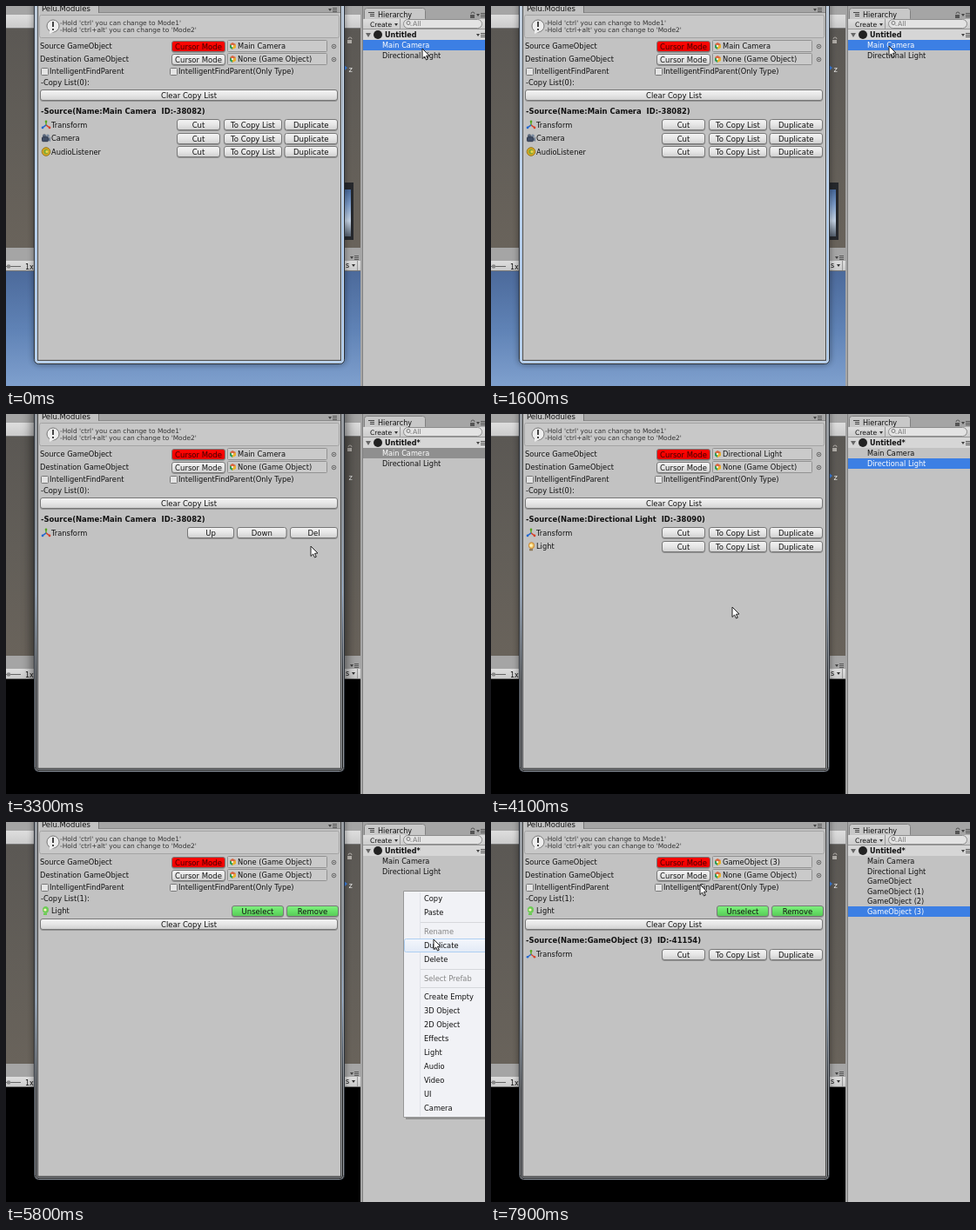
Recreate the animation shown at these times as an HTML page with a canvas. Size 550 px wide and 437 px high, loop 8 s.

```html
<!DOCTYPE html>
<html lang="en">
<head>
<meta charset="utf-8">
<style>
  html, body { margin: 0; width: 550px; height: 437px; overflow: hidden; background: #c2c2c2; }
  canvas { display: block; }
</style>
</head>
<body>
<canvas id="stage" width="550" height="437"></canvas>
<script>
const c = document.getElementById('stage').getContext('2d');
const LOOP = 8000, STEP = 100;

// Pointer tip: time, x, y
const PATH = [
  [0, 478, 49], [100, 478, 57], [900, 478, 57], [1200, 459, 48], [1600, 457, 46], [1700, 457, 46],
  [2100, 335, 185], [2400, 329, 194], [2600, 329, 194], [2800, 350, 152], [3500, 350, 152],
  [3800, 462, 56], [3900, 440, 80], [4100, 277, 222], [4400, 277, 222], [4600, 285, 151],
  [4800, 285, 151], [5100, 453, 113], [5300, 456, 90], [5500, 455, 79], [5600, 458, 84],
  [5800, 491, 135], [6000, 496, 212], [6200, 497, 203], [6400, 497, 203], [6800, 480, 122],
  [7500, 480, 122], [7900, 240, 72]
];
const MENU = [
  ['Copy', 88], ['Paste', 104], ['Rename', 126, 1], ['Duplicate', 142], ['Delete', 158],
  ['Select Prefab', 180, 1], ['Create Empty', 201], ['3D Object', 217], ['2D Object', 233],
  ['Effects', 249], ['Light', 265], ['Audio', 281], ['Video', 297], ['UI', 313], ['Camera', 329]
];
const MODES = [
  [['Cut', 196, 50], ['To Copy List', 250, 67], ['Duplicate', 319.5, 61.5]],
  [['Up', 208, 54], ['Down', 265, 57.5], ['Del', 326, 55]]
];

function rect(x, y, w, h, color) {
  c.fillStyle = color;
  c.fillRect(x, y, w, h);
}
function shade(y, h, ...colors) {
  const g = c.createLinearGradient(0, y, 0, y + h);
  colors.forEach((k, i) => g.addColorStop(i / (colors.length - 1), k));
  return g;
}
function box(x, y, w, h, r, fill, line) {
  c.beginPath();
  c.roundRect(x + .5, y + .5, w - 1, h - 1, r);
  if (fill) { c.fillStyle = fill; c.fill(); }
  if (line) { c.strokeStyle = line; c.lineWidth = 1; c.stroke(); }
}
function poly(points, fill, line) {
  c.beginPath();
  points.forEach(([x, y]) => c.lineTo(x, y));
  c.closePath();
  c.fillStyle = fill;
  c.fill();
  if (line) { c.strokeStyle = line; c.lineWidth = 1; c.stroke(); }
}
function disc(x, y, r, fill, line) {
  c.beginPath();
  c.arc(x, y, r, 0, 7);
  if (fill) { c.fillStyle = fill; c.fill(); }
  if (line) { c.strokeStyle = line; c.lineWidth = 1; c.stroke(); }
}
function text(s, x, y, size = 8.3, color = '#111', weight = '', align = 'left') {
  c.font = `${weight} ${size}px "DejaVu Sans", Verdana, sans-serif`;
  c.textAlign = align;
  c.fillStyle = color;
  c.fillText(s, x, y + 3);
}
function button(s, x, y, w, tones = ['#f5f5f5', '#e6e6e6', '#cecece'], ink = '#111') {
  box(x, y + 1, w, 13, 2.5, null, 'rgba(60,60,60,.35)');
  box(x, y, w, 13, 2.5, shade(y, 13, ...tones), '#777');
  text(s, x + w / 2, y + 6.7, 8.5, ink, '', 'center');
}
const GREEN = ['#83f283', '#68e068', '#55c955'];
const PINK = ['#f8b9b6', '#f1a6a3', '#d98f8c'];
const RED = ['#ff0a05', '#f80000', '#e60000'];

function menuMark(x, y) {
  poly([[x - 5, y - 1], [x - 1, y - 1], [x - 3, y + 2]], '#444');
  for (let i = -2; i < 3; i += 2) rect(x, y + i, 5, 1, '#555');
}
function lock(x, y, color) {
  rect(x - 2, y, 5, 4, color);
  c.strokeStyle = color;
  c.lineWidth = 1;
  c.beginPath();
  c.arc(x + 1, y - 1, 2, Math.PI, 0);
  c.stroke();
}
function cube(x, y) {
  poly([[x - 3, y - 2], [x, y], [x, y + 4], [x - 3, y + 2]], '#2c9b57');
  poly([[x, y], [x + 4, y - 2], [x + 4, y + 2], [x, y + 4]], '#e8b02c');
  poly([[x - 3, y - 2], [x, y - 4], [x + 4, y - 2], [x, y]], '#d9623b');
  disc(x, y, 1.2, '#f4eedb');
}
function icon(kind, x, y, tint) {
  if (kind === 'Transform') {
    c.lineWidth = 1.4;
    [[0, -4, '#55a51c'], [4, 3, '#d5432b'], [-4, 3, '#2468cf']].forEach(([dx, dy, k]) => {
      c.strokeStyle = k;
      c.beginPath();
      c.moveTo(x, y);
      c.lineTo(x + dx, y + dy);
      c.stroke();
      disc(x + dx, y + dy, 1.3, k);
    });
  } else if (kind === 'Camera') {
    disc(x - 2, y - 3, 2, '#586579');
    disc(x + 2, y - 3, 1.8, '#78889d');
    box(x - 5, y - 2, 8, 6, 1, '#414e66', '#303a4d');
    poly([[x + 3, y], [x + 5, y - 2], [x + 5, y + 4], [x + 3, y + 2]], '#6c7c93');
  } else if (kind === 'AudioListener') {
    disc(x, y, 4.8, '#e5a51f', '#8d7a22');
    disc(x, y, 3, '#86aa35');
    disc(x + 1, y, 1.5, '#f2d64a');
  } else {
    box(x - 3, y - 5, 7, 8, 3, tint || '#f3c767', tint || '#c58334');
    disc(x, y - 1, 1.6, '#fff3bd');
    rect(x - 2, y + 3, 4, 2, tint || '#8a7654');
  }
}

function pointer(t) {
  const i = PATH.findIndex(k => k[0] > t);
  if (i < 0) return PATH.at(-1).slice(1);
  const [t0, x0, y0] = PATH[i - 1], [t1, x1, y1] = PATH[i];
  const p = (t - t0) / (t1 - t0);
  return [x0 + (x1 - x0) * p, y0 + (y1 - y0) * p];
}

function stateAt(t) {
  const clones = t < 6700 ? 0 : t < 7300 ? 1 : t < 7500 ? 2 : t < 7700 ? 3 : 4;
  const objects = ['Main Camera', 'Directional Light'];
  for (let i = 0; i < clones; i++) objects.push('GameObject' + (i ? ` (${i})` : ''));
  const light = t >= 500 && t < 1300 || t >= 3800;
  const sel = clones ? clones + 1 : t >= 5300 ? -1 : light ? 1 : 0;
  const parts = sel > 1 ? ['Transform'] : sel === 1 ? ['Transform', 'Light']
    : ['Transform', 'Camera', 'AudioListener'].filter(p =>
      !(p === 'Camera' && t >= 2900) && !(p === 'AudioListener' && t >= 3300));
  return {
    objects, sel, parts,
    id: sel > 1 ? -41142 - 4 * (sel - 2) : sel === 1 ? -38090 : -38082,
    mode: t >= 2200 && t < 3600 ? 1 : 0,
    focus: t >= 2100 && t < 3800 || t >= 4700 && t < 5300,
    copied: t >= 4700,
    dark: t >= 2900,
    menu: t >= 5600 && t < 6500
  };
}

function backdrop(s) {
  rect(0, 0, 410, 437, '#a5a5a5');
  rect(0, 10, 407, 16, shade(10, 16, '#dedede', '#cacaca'));
  rect(0, 25, 407, 1, '#777');
  rect(0, 26, 407, 252, shade(26, 252, '#5b5854', '#625e58', '#69635b'));
  lock(394, 39, '#b0aca7');
  if (!s.focus) poly([[387, 67], [392, 71], [387, 76]], '#3d83e8');
  text('z', 393.5, 73, 8.3, '#eee');
  if (s.sel === 0 && !s.dark) {
    rect(380, 203, 19, 66, '#26282c');
    rect(380, 211, 16, 54, shade(211, 54, '#47699c', '#7f9fcc', '#c6d4e6', '#55606e'));
  }
  menuMark(400, 289);
  rect(0, 293, 407, 12, shade(293, 12, '#dedede', '#cacaca'));
  rect(0, 304, 407, 1, '#777');
  rect(0, 299, 17, 1, '#666');
  disc(3, 299.5, 2.3, '#888');
  text('1x', 22, 300, 8);
  text('s', 390, 298, 8);
  poly([[397, 297], [401, 297], [399, 300]], '#333');
  rect(403, 293, 1, 11, '#999');
  rect(0, 305, 407, 132, s.dark ? '#000' : shade(305, 132, '#4c6a9b', '#5f82b5', '#7fa0ce'));
  rect(407, 0, 3, 437, '#a5a5a5');
  rect(409, 0, 1, 437, '#828282');
}

function frame(s) {
  const glass = s.dark ? ['#a3a8ae', '#8e959c', '#8fa9c8', '#111', '#111']
    : ['#b4bec9', '#96a1ae', '#a9c9ee', '#8fb5e4', '#9fc2ea'];
  c.save();
  c.shadowColor = s.focus ? 'rgba(0,0,0,.7)' : 'rgba(0,0,0,.4)';
  c.shadowBlur = s.focus ? 14 : 7;
  box(32, -10, 357, 422, 5, shade(0, 411, ...glass), '#2a3038');
  c.restore();
  const edge = s.dark ? '#9a9ea3' : '#d3e3f5';
  box(33, -10, 355, 421, 4, null, edge);
  box(35, -10, 351, 419, 1, null, edge);
  rect(36, 0, 349, 408, '#444');
  rect(37, 0, 347, 407, '#c2c2c2');
}

function sourceField(label, y, value, active) {
  text(label, 39, y);
  button('Cursor Mode', 190, Math.round(y - 5.6), 62, active ? RED : undefined, active ? '#400' : '#111');
  box(254, y - 7, 115, 14, 1, '#cacaca', '#929292');
  cube(260, y);
  text(value, 266, y);
  disc(376.5, y + .5, 2.3, null, '#666');
  disc(376.5, y + .5, .8, '#444');
}
function check(label, x) {
  box(x, 71, 9, 9, 1, '#e4e4e4', '#777');
  text(label, x + 10, 75);
}

function panel(s) {
  const name = s.objects[s.sel];
  rect(107, 0, 277, 7, '#a5a5a5');
  rect(107, 7, 277, 1, '#898989');
  rect(106, 0, 1, 8, '#777');
  text('Pelu.Modules', 41, 2.5, 8.5);
  menuMark(375, 4);

  box(38, 10, 345, 27, 2, '#c8c8c8', '#a4a4a4');
  disc(54, 23, 7, '#eee', '#777');
  poly([[50, 28], [56, 29], [50, 32]], '#eee');
  rect(53, 18, 2, 6, '#444');
  rect(53, 26, 2, 2, '#444');
  text("-Hold 'ctrl' you can change to Mode1'", 62, 19, 7.45, '#333');
  text("-Hold 'ctrl+alt' you can change to 'Mode2'", 62, 27, 7.45, '#333');

  sourceField('Source GameObject', 46, name || 'None (Game Object)', true);
  sourceField('Destination GameObject', 61, 'None (Game Object)');
  check('IntelligentFindParent', 40);
  check('IntelligentFindParent(Only Type)', 188);
  text(`-Copy List(${+s.copied}):`, 40, 88);
  const shift = s.copied ? 15.3 : 0;
  if (s.copied) {
    icon('Light', 45, 102, '#6ccc55');
    text('Light', 52, 102);
    button('Unselect', 259, 96, 60, GREEN);
    button('Remove', 322, 96, 60, GREEN);
  }
  button('Clear Copy List', 39, Math.round(96 + shift), 342);
  if (!name) return;
  text(`-Source(Name:${name}  ID:${s.id})`, 40, 121 + shift, 8.43, '#111', 'bold');
  s.parts.forEach((part, i) => {
    const y = 136.9 + shift + i * 15.3;
    const hot = s.copied && part === 'Light';
    icon(part, 46, y, hot && '#ed8058');
    text(part, 52, y);
    MODES[s.mode].forEach(([label, x, w]) => button(label, x, Math.round(y - 6.5), w, hot ? PINK : undefined));
  });
}

function hierarchy(s) {
  rect(410, 0, 140, 437, '#c2c2c2');
  rect(410, 0, 140, 15, '#a5a5a5');
  box(411, 2, 71, 16, 3, '#c8c8c8', '#808080');
  for (let i = 0; i < 3; i++) rect(416 + (i ? 2 : 0), 7 + i * 2, i ? 5 : 7, 1, '#444');
  text('Hierarchy', 427, 9.5, 8.1);
  lock(535, 10, '#555');
  menuMark(545, 10);
  rect(410, 15, 140, 12, shade(15, 12, '#dedede', '#cacaca'));
  rect(410, 26, 140, 1, '#999');
  text('Create', 418, 21, 7.6);
  poly([[446, 20], [450, 20], [448, 23]], '#333');
  rect(452, 15, 1, 11, '#999');
  box(456, 15, 91, 11, 5, '#e3e3e3', '#8d8d8d');
  disc(462, 19.5, 2, null, '#777');
  poly([[464, 21], [466, 23], [465, 23]], '#777');
  text('All', 467, 20, 7.8, '#777');

  rect(410, 27, 140, 12, '#d6d6d6');
  poly([[413, 31], [419, 31], [416, 36]], '#666');
  disc(427, 33, 5, '#222');
  text('Untitled' + (s.dark ? '*' : ''), 435, 33, 8, '#111', 'bold');
  menuMark(545, 33);
  s.objects.forEach((name, i) => {
    const y = 45 + i * 11.6, on = i === s.sel;
    if (on) rect(410, Math.round(y - 6), 140, 12, s.focus ? '#8f8f8f' : '#3c7fe4');
    text(name, 432, y, 8.2, on ? '#fff' : '#111');
  });
}

function contextMenu(y) {
  rect(459, 82, 91, 260, 'rgba(0,0,0,.25)');
  box(456, 79, 100, 261, 0, '#f1f2f6', '#979797');
  rect(475, 81, 1, 257, '#e1e3e8');
  for (const line of [115, 169, 190]) rect(476, line, 74, 1, '#d6d8dc');
  for (const [label, row, off] of MENU) {
    if (Math.abs(y - row) < 8) box(457, row - 8, 100, 16, 2, shade(row - 8, 16, '#f4f7fc', '#e2eaf6'), '#aecff2');
    text(label, 480, row, 8.3, off ? '#858585' : '#111');
  }
}

function cursor(x, y) {
  const tip = [[0, 0], [0, 11.5], [2.6, 9], [4.5, 13], [6.3, 12.2], [4.5, 8.3], [8, 8]];
  poly(tip.map(([dx, dy]) => [x + dx, y + dy]), '#fff', '#222');
}

function draw(now) {
  const t = Math.floor(now % LOOP / STEP) * STEP;
  const s = stateAt(t), [x, y] = pointer(t);
  backdrop(s);
  frame(s);
  panel(s);
  hierarchy(s);
  if (s.menu) contextMenu(y);
  cursor(x, y);
}

let start;
function tick(now) {
  start ??= now;
  draw(now - start);
  requestAnimationFrame(tick);
}
draw(0);
requestAnimationFrame(tick);
</script>
</body>
</html>
```
